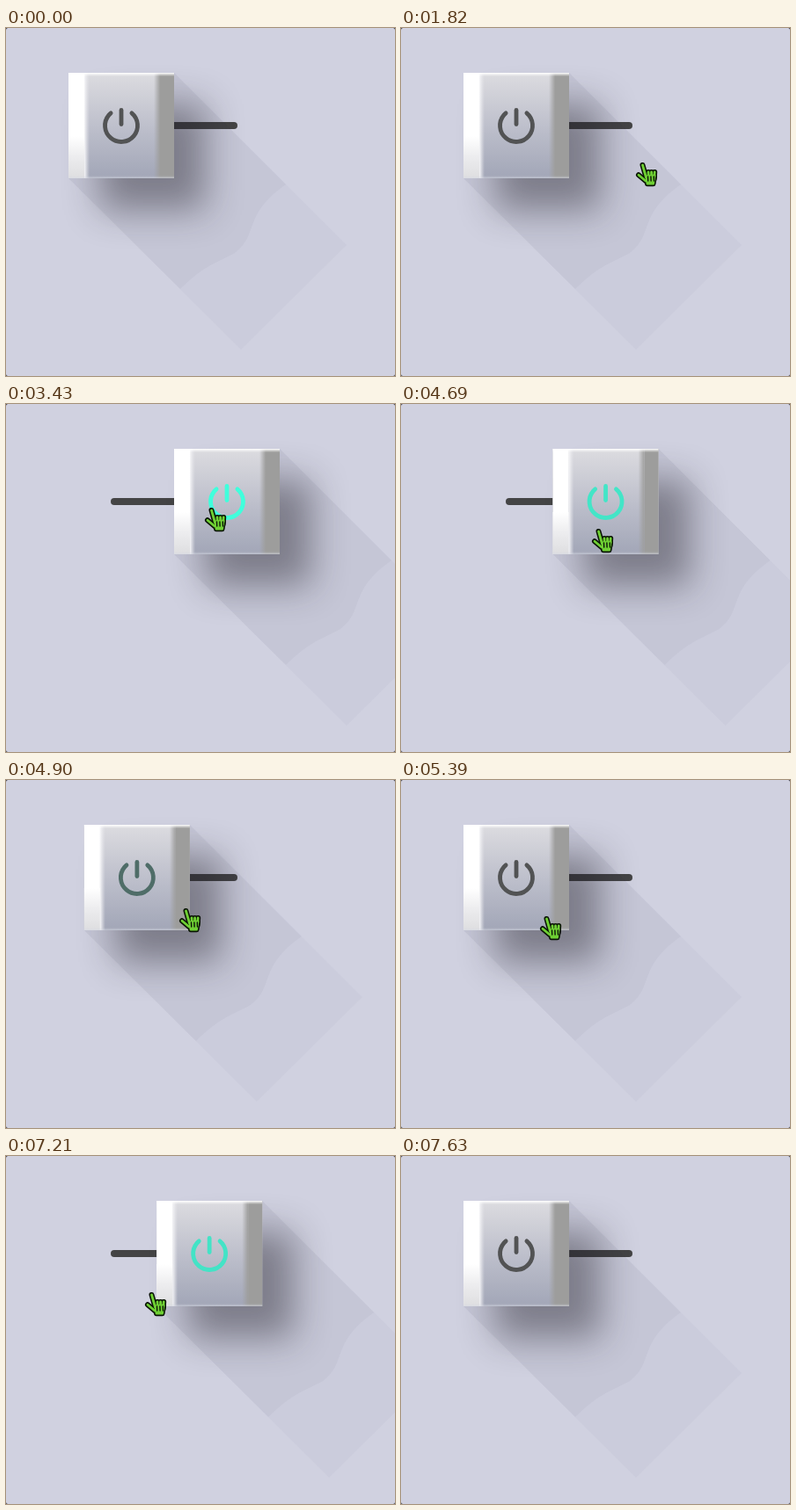
These frames come from a looping animation (442x396 px, 8.12 s). An HTML page with a canvas:

```html
<!DOCTYPE html>
<html lang="en">
<head>
<meta charset="utf-8">
<title>Power switch</title>
<style>
  html, body { margin: 0; width: 100%; height: 100%; overflow: hidden; background: #d0d1e0; }
  canvas { display: block; width: 442px; height: 396px; }
</style>
</head>
<body>
<canvas id="stage" width="442" height="396"></canvas>
<script>
const ctx = document.getElementById('stage').getContext('2d');
const LOOP = 8120, STEP = 70, SLIDE = 500, TRAVEL = 120;
const LEFT = 71, TOP = 51, SIZE = 120, RIGHT = LEFT + SIZE, BOTTOM = TOP + SIZE;
const OFF = [82, 83, 84], ON = [64, 255, 220];
const toggles = [2663, 4623, 5963, 7140];

// Pointer moves from where it rests: start, duration, x, y
const entry = [255, 400];
const glides = [
  [140, 350, 157, 133],
  [700, 210, 148, 133],
  [1750, 70, 266, 152],
  [2170, 70, 391, 168],
  [2240, 210, 125, 137],
  [2800, 420, 225, 117],
  [3920, 210, 216, 141],
  [4760, 420, 157, 154],
  [7210, 350, 220, 400]
];

const mix = (a, b, k) => a + (b - a) * k;
const clamp = k => Math.min(1, Math.max(0, k));

// cubic-bezier(.25, .1, .25, 1)
function ease(x) {
  const curve = (a, b, s) => 3 * a * s * (1 - s) ** 2 + 3 * b * s * s * (1 - s) + s ** 3;
  let lo = 0, hi = 1;
  for (let i = 0; i < 20; i++) {
    const mid = (lo + hi) / 2;
    if (curve(.25, .25, mid) < x) lo = mid; else hi = mid;
  }
  return curve(.1, 1, lo);
}

const switchState = t => toggles.reduce((sum, start, i) =>
  sum + (-1) ** i * ease(clamp((t - start) / SLIDE)), 0);

const pointerAt = t => glides.reduce(([px, py], [start, duration, x, y]) => {
  const k = clamp((t - start) / duration);
  return [mix(px, x, k), mix(py, y, k)];
}, entry);

// Evenly spaced colour stops
function gradient(x0, y0, x1, y1, ...colors) {
  const g = ctx.createLinearGradient(x0, y0, x1, y1);
  colors.forEach((color, i) => g.addColorStop(i / (colors.length - 1), color));
  return g;
}

const across = (x, w, ...colors) => gradient(x, 0, x + w, 0, ...colors);
const down = (y, h, ...colors) => gradient(0, y, 0, y + h, ...colors);

function box(x, y, w, h, fill) {
  ctx.fillStyle = fill;
  ctx.fillRect(x, y, w, h);
}

function pill(x, y, w, h, r, fill) {
  ctx.fillStyle = fill;
  ctx.beginPath();
  ctx.roundRect(x, y, w, h, r);
  ctx.fill();
}

function line(x0, y0, x1, y1) {
  ctx.beginPath();
  ctx.moveTo(x0, y0);
  ctx.lineTo(x1, y1);
  ctx.stroke();
}

// Diagonal band cast by the knob; traceEnd draws its far edge
function castBand(alpha, traceEnd) {
  ctx.fillStyle = `rgba(40,42,70,${alpha})`;
  ctx.beginPath();
  ctx.moveTo(RIGHT, TOP);
  traceEnd();
  ctx.lineTo(LEFT, BOTTOM);
  ctx.fill();
}

function drawLongShadow() {
  castBand(.028, () => {
    ctx.lineTo(RIGHT + 196, TOP + 196);
    ctx.lineTo(LEFT + 196, BOTTOM + 195);
  });
  castBand(.035, () => {
    ctx.lineTo(RIGHT + 127, TOP + 127);
    ctx.bezierCurveTo(268, 213, 288, 235, 260, 256);
    ctx.bezierCurveTo(240, 267, 225, 270, LEFT + 127, BOTTOM + 126);
  });
}

function drawKnob() {
  ctx.save();
  ctx.shadowColor = 'rgba(30,27,38,.43)';
  ctx.shadowBlur = 40;
  ctx.shadowOffsetX = ctx.shadowOffsetY = 36;
  box(LEFT, TOP, SIZE, SIZE, '#bbb');
  ctx.restore();

  box(LEFT, TOP, SIZE, SIZE, down(TOP, SIZE, '#dcdce0', '#bec0cc', '#a2a6b7'));
  box(RIGHT - 23, TOP, 7, SIZE, across(RIGHT - 23, 7, 'rgba(158,158,157,0)', '#9e9e9d'));
  box(RIGHT - 16, TOP, 16, SIZE, '#9d9d9c');
  box(LEFT, TOP, 18, SIZE, '#fff');
  box(LEFT, BOTTOM - 48, 18, 48, down(BOTTOM - 48, 48, '#fff', '#ececee', '#dedee0'));
  box(LEFT + 18, TOP, 6, SIZE, across(LEFT + 18, 6, '#f6f6f8', 'rgba(230,230,235,0)'));

  box(LEFT, TOP, SIZE, 4, down(TOP, 4, '#fff', 'rgba(255,255,255,0)'));
  box(LEFT, BOTTOM - 3, SIZE, 3, down(BOTTOM - 3, 3, 'rgba(215,218,228,0)', 'rgba(215,218,228,.6)'));
}

function drawIcon(state) {
  const gap = 40 * Math.PI / 180, up = -Math.PI / 2;
  ctx.strokeStyle = `rgb(${OFF.map((c, i) => Math.round(mix(c, ON[i], state)))})`;
  ctx.lineWidth = 4.8;
  ctx.lineCap = 'round';
  ctx.beginPath();
  ctx.arc(131, 111, 18.5, up + gap, up - gap + 2 * Math.PI);
  ctx.stroke();
  line(131, 93.5, 131, 109.5);
}

function drawHand(width, color) {
  ctx.strokeStyle = ctx.fillStyle = color;
  ctx.lineWidth = width;
  line(8.5, 4, 12.5, 18);
  line(4, 15.2, 12, 22);
  for (let i = 0; i < 3; i++) line(15 + 3.6 * i, 12, 15.5 + 3 * i, 20);
  ctx.beginPath();
  ctx.moveTo(13, 17);
  ctx.lineTo(22, 16);
  ctx.lineTo(20.5, 25.2);
  ctx.lineTo(14, 25.2);
  ctx.closePath();
  ctx.fill();
  ctx.stroke();
}

function drawPointer([x, y]) {
  ctx.save();
  ctx.translate(Math.round(x), Math.round(y));
  ctx.lineJoin = ctx.lineCap = 'round';
  drawHand(6, '#0a1405');
  drawHand(2.8, '#6fd034');
  ctx.strokeStyle = '#0a1405';
  ctx.lineWidth = 1.4;
  for (let i = 0; i < 3; i++) line(14.5 + 3.4 * i, 17, 14.7 + 3.4 * i, 22);
  ctx.restore();
}

function draw(time) {
  const t = Math.floor(time % LOOP / STEP) * STEP;
  const state = switchState(t);
  box(0, 0, 442, 396, '#3c3c44');
  pill(0, 0, 442, 396, 2.5, '#d0d1e0');
  pill(119, 107, 144, 8, 4, '#444445');
  ctx.save();
  ctx.translate(TRAVEL * state, 0);
  drawLongShadow();
  drawKnob();
  drawIcon(state);
  ctx.restore();
  drawPointer(pointerAt(t));
}

const began = performance.now();
function tick() {
  draw(performance.now() - began);
  requestAnimationFrame(tick);
}
tick();
</script>
</body>
</html>
```
